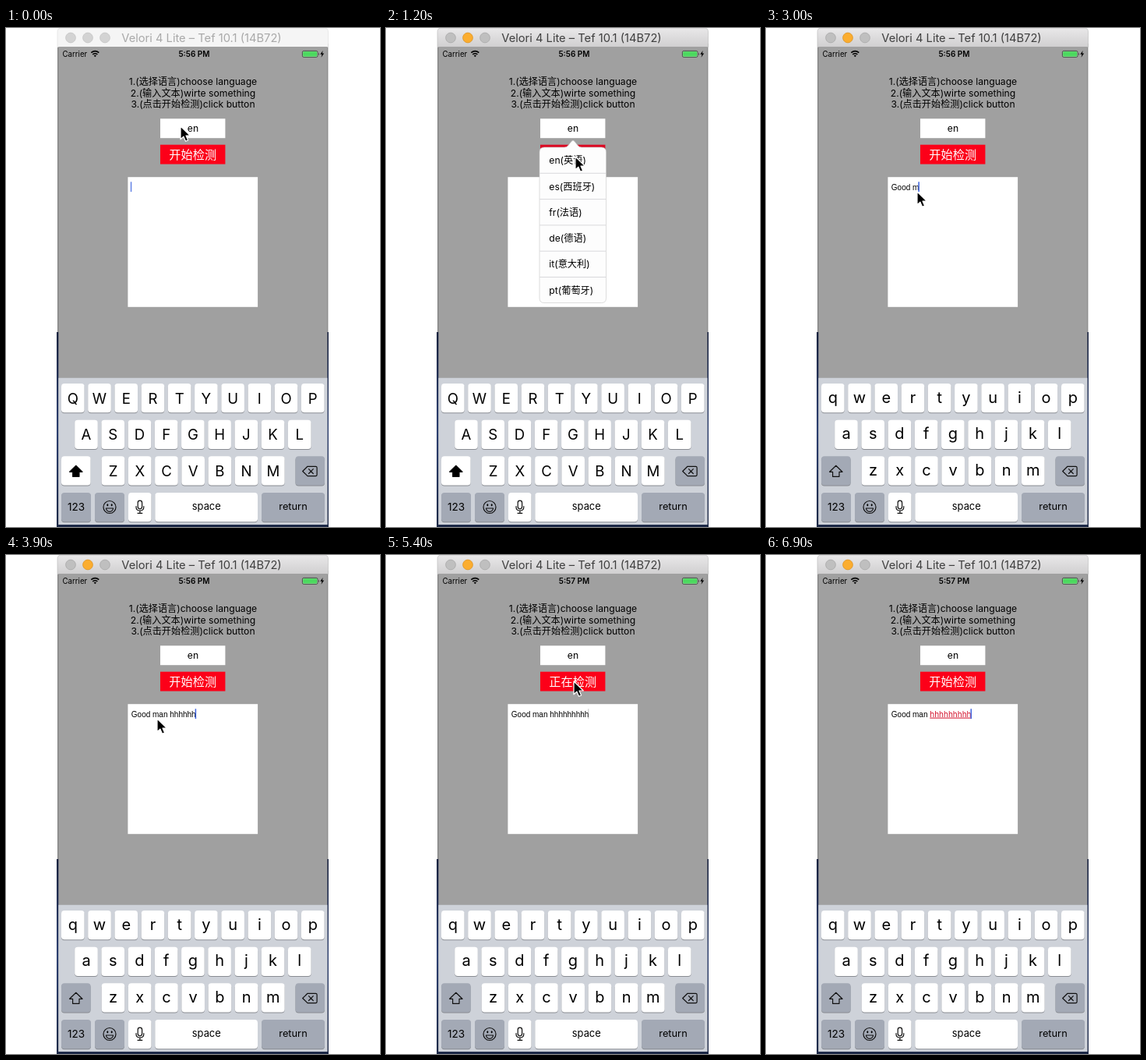
An HTML page for the animation above (7.2 s loop, 480 by 640 pixels).

```html
<!DOCTYPE html>
<html lang="en">
<head>
<meta charset="utf-8">
<title>Language check demo</title>
<style>
  html, body { margin: 0; width: 100%; height: 100%; overflow: hidden; background: #fff; }
  svg { display: block; width: 480px; height: 640px; }
  text { font-family: Inter, "Noto Sans CJK SC", "Noto Sans CJK", sans-serif; white-space: pre; }
  .mid { text-anchor: middle; }
  .line { fill: none; stroke: #111; stroke-width: 1.2; stroke-linejoin: round; stroke-linecap: round; }
</style>
</head>
<body>
<svg id="stage" viewBox="0 0 480 640" xmlns="http://www.w3.org/2000/svg">
  <defs>
    <linearGradient id="bar" x2="0" y2="1">
      <stop stop-color="#e9e8e9"/><stop offset="1" stop-color="#d0cfd0"/>
    </linearGradient>
    <linearGradient id="desk" x2="0" y2="1">
      <stop stop-color="#1b2440"/><stop offset=".5" stop-color="#2c3f70"/><stop offset="1" stop-color="#1d2947"/>
    </linearGradient>
  </defs>

  <rect x="65" y="390" width="349" height="250" fill="url(#desk)"/>
  <rect x="66" y="20" width="347.4" height="370" fill="#858585"/>
  <path id="titleBar" d="M66 24.5V5q0-5 5-5H408.500q5 0 5 5V24.500Z"/>
  <g id="lights" stroke-width=".8"></g>
  <text id="title" class="mid" x="251" y="18" font-size="14.7">Velori 4 Lite – Tef 10.1 (14B72)</text>

  <rect x="67.400" y="24" width="345" height="613" fill="#a0a0a0"/>

  <g id="status">
    <text x="72.500" y="37" font-size="9.700">Carrier</text>
    <g fill="none" stroke="#000" stroke-width="1.600">
      <path d="M109.300 31.700q5-4.200 10 0M111.200 34q3.100-2.500 6.200 0"/>
    </g>
    <path d="M112.600 35.300q1.700-1.200 3.400 0L114.300 37.200Z"/>
    <text id="clock" class="mid" x="241.500" y="37" font-size="10" font-weight="600"></text>
    <rect x="380.400" y="29.400" width="19.600" height="8" rx="1.800" fill="#a8d8ae" stroke="#222" stroke-width=".7"/>
    <rect x="381.300" y="30.300" width="17.800" height="6.200" rx="1" fill="#4cd95f"/>
    <path d="M401 32q1.300 1.400 0 2.800Z"/>
    <path d="M406.700 29L403.300 33.700H405.500L404.500 37.700L408.200 32.500H405.900Z"/>
  </g>

  <g class="mid" font-size="12.150">
    <text x="240" y="72.500">1.(选择语言)choose language</text>
    <text x="240" y="87.500">2.(输入文本)wirte something</text>
    <text x="240" y="102.200">3.(点击开始检测)click button</text>
    <rect x="198" y="116.300" width="83.400" height="24.900" fill="#fff"/>
    <text x="240" y="133.300">en</text>
  </g>
  <rect id="button" x="198" y="149.700" width="83.400" height="24.900"/>
  <text id="label" class="mid" x="239.700" y="167.600" font-size="15.200" font-weight="300" fill="#fff"></text>

  <rect x="156.400" y="191.200" width="166.700" height="166.600" fill="#fff"/>
  <text id="note" x="160.800" y="207.600" font-size="10" style="font-family:'Liberation Sans',Arial,sans-serif"><tspan id="plain"></tspan><tspan id="marked" fill="#d3122c" text-decoration="underline" style="font-family:Inter,sans-serif"></tspan></text>
  <rect id="caret" y="197.300" width="1.500" height="12.800"/>

  <g id="paste">
    <path d="M138 152H183.500q6.500 0 6.500 6.500V175.500q0 6.500-6.500 6.500H167.500L160.500 189.200L153.500 182H138q-6.500 0-6.500-6.500V158.500q0-6.500 6.500-6.500Z" fill="#171717"/>
    <text class="mid" x="160.700" y="171.200" font-size="11" fill="#fff">Paste</text>
  </g>

  <g id="menu" font-size="12.200">
    <path d="M203 153H229q3 0 5-2.500L238 145.500q2-2.400 4 0L246 150.500q2 2.500 5 2.500H276.500q6 0 6 6V346.500q0 6-6 6H203q-6 0-6-6V159q0-6 6-6Z" fill="#fdfdfd" stroke="#c6c6c6" stroke-width=".6"/>
  </g>

  <g id="keyboard">
    <rect x="67.400" y="448.800" width="345" height="188.200" fill="#ced2d9"/>
  </g>

  <path id="mouse" d="M0 0V16.800L3.900 13.200L6.500 19.300L9.600 18L7 12H12.300Z" stroke="#fff" stroke-width="1.200" stroke-linejoin="round"/>
</svg>

<script>
const NS = 'http://www.w3.org/2000/svg';
const LOOP = 7200, TICK = 300;
const $ = id => document.getElementById(id);

function add(parent, tag, attrs, text) {
  const el = document.createElementNS(NS, tag);
  for (const k in attrs) el.setAttribute(k, attrs[k]);
  if (text) el.textContent = text;
  parent.appendChild(el);
  return el;
}
const set = (id, attrs) => { for (const k in attrs) $(id).setAttribute(k, attrs[k]); };
const show = (id, on) => set(id, { visibility: on ? 'visible' : 'hidden' });
const write = (id, text) => { if ($(id).textContent !== text) $(id).textContent = text; };

const lights = [83, 105, 127].map(cx => add($('lights'), 'circle', { cx, cy: 12.5, r: 6.4 }));

['en(英语)', 'es(西班牙)', 'fr(法语)', 'de(德语)', 'it(意大利)', 'pt(葡萄牙)'].forEach((name, i) => {
  const y = 153 + i * 33.3;
  if (i) add($('menu'), 'path', { d: `M197.300 ${y}H282.200`, stroke: '#d0d0d3', 'stroke-width': .8 });
  add($('menu'), 'text', { x: 209.3, y: y + 21.2 }, name);
});

// Keyboard
const kb = $('keyboard'), WHITE = '#fff', GREY = '#a3a9b5';
const rowY = i => 456 + i * 46.65;

function key(x, row, w, fill) {
  const box = { x, width: w, height: 37.3, rx: 4 };
  add(kb, 'rect', { ...box, y: rowY(row) + 1, fill: '#898c92' });
  return add(kb, 'rect', { ...box, y: rowY(row), fill });
}
function caption(x, y, size, text) {
  return add(kb, 'text', { x, y, 'font-size': size, class: 'mid' }, text);
}

const letters = [];
[['QWERTYUIOP', 71], ['ASDFGHJKL', 88.2], ['ZXCVBNM', 122.7]].forEach(([row, x0], r) => {
  [...row].forEach((ch, i) => {
    const x = x0 + i * 34.22;
    key(x, r, 29.6, WHITE);
    letters.push({ ch, r, el: caption(x + 14.8, 0, 19, ch) });
  });
});

const shiftKey = key(71, 2, 37.6, WHITE);
const shiftIcon = add(kb, 'path', {
  d: 'M89.800 561.300L98 569.300H94V575.300H85.600V569.300H81.600Z', class: 'line'
});
key(371.5, 2, 37.5, GREY);
add(kb, 'path', {
  d: 'M387 562.300H397.500q1.600 0 1.600 1.600V573q0 1.600-1.600 1.600H387L380.700 568.500ZM388.500 565.700L394.300 571.500M394.300 565.700L388.500 571.500',
  class: 'line'
});

key(71, 3, 38, GREY);
caption(90, 619.4, 13.5, '123');
key(114, 3, 38, GREY);
add(kb, 'circle', { cx: 133, cy: 614.5, r: 8, class: 'line' });
add(kb, 'path', { d: 'M128.400 616H137.600Q136.800 620.300 133 620.300T128.400 616Z', class: 'line' });
for (const cx of [130.3, 135.7]) add(kb, 'ellipse', { cx, cy: 611.8, rx: 1, ry: 1.5 });
key(157, 3, 29.5, WHITE);
add(kb, 'rect', { x: 169.2, y: 606.2, width: 5.4, height: 10.6, rx: 2.7, class: 'line' });
add(kb, 'path', { d: 'M167 613.500V614.500Q167 619 171.900 619T176.800 614.500V613.500M171.900 619V622.300M169 622.300H174.800', class: 'line' });
key(191.3, 3, 131.7, WHITE);
caption(257.3, 618.2, 12.9, 'space');
key(328, 3, 81, GREY);
caption(368.5, 618.2, 12.8, 'return');

// Each cue changes only what it names.
const READY = '开始检测', BUSY = '正在检测', WORD = 'hhhhhhhhh';
const cues = [
  [0, { mouse: [224, 126], clock: '5:56 PM', label: READY, caps: true, caret: .8, plain: '', marked: '' }],
  [300, { active: true, caret: 1 }],
  [600, { menu: true, caret: 0 }],
  [900, { mouse: [236, 148] }],
  [1200, { mouse: [243, 165] }],
  [1500, { menu: false, mouse: [224, 186], caret: 1 }],
  [1800, { mouse: [194, 210] }],
  [2100, { paste: true }],
  [2400, { paste: false }],
  [2700, { plain: 'Goo', caps: false }],
  [3000, { plain: 'Good m' }],
  [3600, { plain: 'Good man h' }],
  [3900, { plain: 'Good man hhhhhh' }],
  [4200, { plain: 'Good man ' + WORD }],
  [4500, { mouse: [220, 184] }],
  [4800, { mouse: [241, 162], label: BUSY }],
  [5100, { clock: '5:57 PM' }],
  [5400, { caret: .35, faded: true }],
  [5700, { caret: 0 }],
  [6000, { label: READY, plain: 'Good man ', marked: WORD, caret: 1, faded: false }],
  [6300, { mouse: null }],
  [6600, { caret: 0 }],
  [6900, { caret: 1 }]
];

const stateAt = t => Object.assign({}, ...cues.filter(c => c[0] <= t).map(c => c[1]));

function draw(t) {
  const s = stateAt(t);
  set('titleBar', { fill: s.active ? 'url(#bar)' : '#f5f5f5', stroke: s.active ? '#b9b9b9' : '#dcdcdc', 'stroke-width': .6 });
  set('title', { fill: s.active ? '#3f3f3f' : '#a9a9a9' });
  lights.forEach((el, i) => {
    const lit = s.active && i === 1;
    el.setAttribute('fill', lit ? '#fbad2f' : s.active ? '#bfbfbf' : '#d3d3d3');
    el.setAttribute('stroke', lit ? '#dc9425' : s.active ? '#a9a9a9' : '#c4c4c4');
  });

  for (const id of ['clock', 'label', 'plain', 'marked']) write(id, s[id]);
  set('button', { fill: s.menu ? '#dc0822' : '#fc0019' });
  show('menu', s.menu);
  show('paste', s.paste);

  set('caret', {
    x: 159.8 + $('note').getComputedTextLength(),
    width: s.faded ? 1 : 1.5,
    fill: s.faded ? '#555' : '#3d63df',
    opacity: s.caret
  });

  for (const { ch, r, el } of letters) {
    const text = s.caps ? ch : ch.toLowerCase();
    if (el.textContent !== text) el.textContent = text;
    el.setAttribute('font-size', s.caps ? 18.6 : 20);
    el.setAttribute('y', rowY(r) + (s.caps ? 25.6 : 24.8));
  }
  shiftKey.setAttribute('fill', s.caps ? WHITE : GREY);
  shiftIcon.style.fill = s.caps ? '#000' : 'none';

  show('mouse', s.mouse);
  if (s.mouse) set('mouse', { transform: `translate(${s.mouse})` });
}

let last = -1;
function loop() {
  const t = Math.floor((performance.now() % LOOP) / TICK) * TICK;
  if (t !== last) draw(last = t);
  requestAnimationFrame(loop);
}
loop();
</script>
</body>
</html>
```
